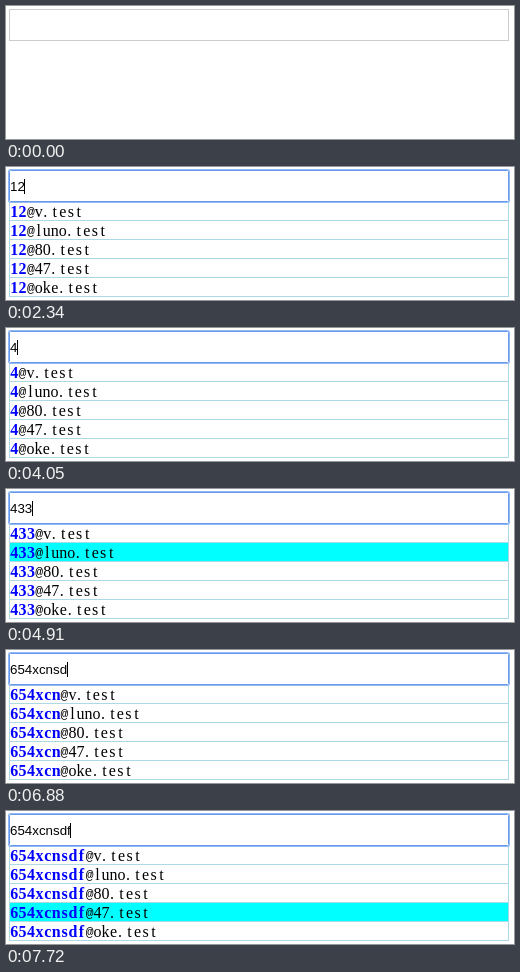
Write an HTML page that moves like this. It is 508 px wide and 133 px high and loops after 8000 ms.

```html
<!DOCTYPE html>
<html lang="en">
<head>
<meta charset="utf-8">
<title>Email autocomplete</title>
<style>
  html, body { margin: 0; width: 100%; height: 100%; overflow: hidden; background: #fff; }
  svg { display: block; }
  .typed { font: 13.33px "Liberation Sans", Arial, sans-serif; }
  .mono { font: 16px "Liberation Serif", "Times New Roman", serif; text-anchor: middle; }
  .bold { font-weight: bold; fill: #00f; }
  .at { font: 13px "Liberation Mono", monospace; }
  .light { fill: #fff; }
</style>
</head>
<body>
<svg id="stage" width="508" height="133" viewBox="0 0 508 133" xmlns="http://www.w3.org/2000/svg">
  <g id="tags"></g>
  <g id="list"></g>
  <rect id="border" x="3.5" y="3.5" width="499" height="31" fill="none" stroke="#ccc"/>
  <g id="ring" fill="none">
    <rect x="2.5" y="2.5" width="501" height="33" rx="1.5" stroke="#83adf2" stroke-opacity=".85"/>
    <rect x="3.5" y="3.5" width="499" height="31" rx="1" stroke="#6699ec"/>
  </g>
  <text id="typed" class="typed" x="4" y="24"></text>
  <rect id="caret" y="12" width="1" height="15"/>
  <path id="beam" d="M0 .5h3M4 .5h3M3.5 1v14M0 15.5h3M4 15.5h3" fill="none" stroke="#000"/>
</svg>
<script>
const LOOP = 8000;
const DOMAINS = ["v.test", "luno.test", "80.test", "47.test", "oke.test"];
const CELL = 8, BOLD_CELL = 8.4, ROW = 19;

// start time, typed text, text used by the list, highlighted row
const TYPING = [
  [2090, "1", "1"], [2210, "12", "1"], [2340, "12", "12"],
  [2580, "123", "12"], [2700, "123", "123"], [2940, "123", "123", 0],
  [3310, "", ""],
  [4050, "4", "4"], [4180, "43", "4"], [4290, "43", "43"],
  [4410, "433", "43"], [4540, "433", "433"],
  [4660, "433", "433", 0], [4910, "433", "433", 1], [5030, "433", "433", 2],
  [5400, "", ""],
  [5890, "65", "6"], [6020, "654", "654"],
  [6510, "654xcn", "654"], [6630, "654xcn", "654xcn"],
  [6880, "654xcnsd", "654xcn"], [7000, "654xcnsdf", "654xcnsd"],
  [7120, "654xcnsdf", "654xcnsdf"], [7240, "654xcnsdf", "654xcnsdf", 0],
  [7480, "654xcnsdf", "654xcnsdf", 1], [7600, "654xcnsdf", "654xcnsdf", 2],
  [7720, "654xcnsdf", "654xcnsdf", 3]
];
// start time, left, top of the text pointer
const POINTER = [[370, 212, -10], [490, 205, -4], [610, 196, 2], [740, 188, 5], [860, 190, 3]];
const TAGS = [[3310, "123", 0], [5400, "433", 2]];

const $ = id => document.getElementById(id);
const parts = {};
for (const id of ["tags", "list", "border", "ring", "typed", "caret", "beam"]) parts[id] = $(id);

const latest = (steps, t) => steps.filter(s => s[0] <= t).pop();
const show = (el, on) => el.setAttribute("visibility", on ? "visible" : "hidden");
const rect = (x, y, w, h, fill, rx = 0) =>
  `<rect x="${x}" y="${y}" width="${w}" height="${h}" rx="${rx}" fill="${fill}"/>`;

// One glyph per fixed-width cell
function cells(str, x, y, step, cls) {
  const xs = [...str].map((c, i) => (x + (i + .5) * step - (c === "." ? 1.5 : 0)).toFixed(1));
  return `<text class="mono ${cls}" x="${xs.join(" ")}" y="${y}">${str}</text>`;
}

function address(name, domain, x, y, step, nameCls, cls) {
  const at = x + name.length * step;
  return cells(name, x, y, step, nameCls) +
    cells("@", at, y - 1, CELL, "at " + cls) +
    cells(domain, at + CELL, y, CELL, cls);
}

function drawList(name, active) {
  if (!name) return "";
  let out = rect(3, 35, 500, 95, "#fff");
  DOMAINS.forEach((domain, i) => {
    const y = 35 + i * ROW;
    if (i === active) out += rect(4, y, 498, 18, "#0ff");
    out += rect(3, y + 18, 500, 1, "#add8e6") +
      address(name, domain, 4, y + 15, BOLD_CELL, "bold", "");
  });
  return out + rect(3, 35, 1, 95, "#add8e6") + rect(502, 35, 1, 95, "#add8e6");
}

function drawTags(t) {
  let x = 3, out = "";
  for (const [start, name, i] of TAGS) {
    if (t < start) break;
    const w = (name.length + 1 + DOMAINS[i].length) * CELL + 10;
    out += rect(x, 36, w, 16, "#808080", 5) +
      address(name, DOMAINS[i], x + 5, 50, CELL, "light", "light");
    x += w + 8;
  }
  return out;
}

let shown = "";
function draw(t) {
  const [, typed, name, active] = latest(TYPING, t) || [0, "", ""];
  const pointer = t < 1600 && latest(POINTER, t);
  const focused = t >= 1100;
  const blinkOff = (t >= 1600 && t < 2090) || (t >= 3810 && t < 4050);
  const key = [typed, name, active, pointer, focused, blinkOff].join("|");
  if (key === shown) return;
  shown = key;

  parts.tags.innerHTML = drawTags(t);
  parts.list.innerHTML = drawList(name, active);
  parts.typed.textContent = typed;
  const end = 4 + (typed ? parts.typed.getComputedTextLength() : 0);
  parts.caret.setAttribute("x", Math.floor(end));
  show(parts.caret, focused && !blinkOff);
  show(parts.ring, focused);
  show(parts.border, !focused);
  show(parts.beam, pointer);
  if (pointer) parts.beam.setAttribute("transform", `translate(${pointer[1]} ${pointer[2]})`);
}

const begin = performance.now();
function tick() {
  draw((performance.now() - begin) % LOOP);
  requestAnimationFrame(tick);
}
tick();
</script>
</body>
</html>
```
